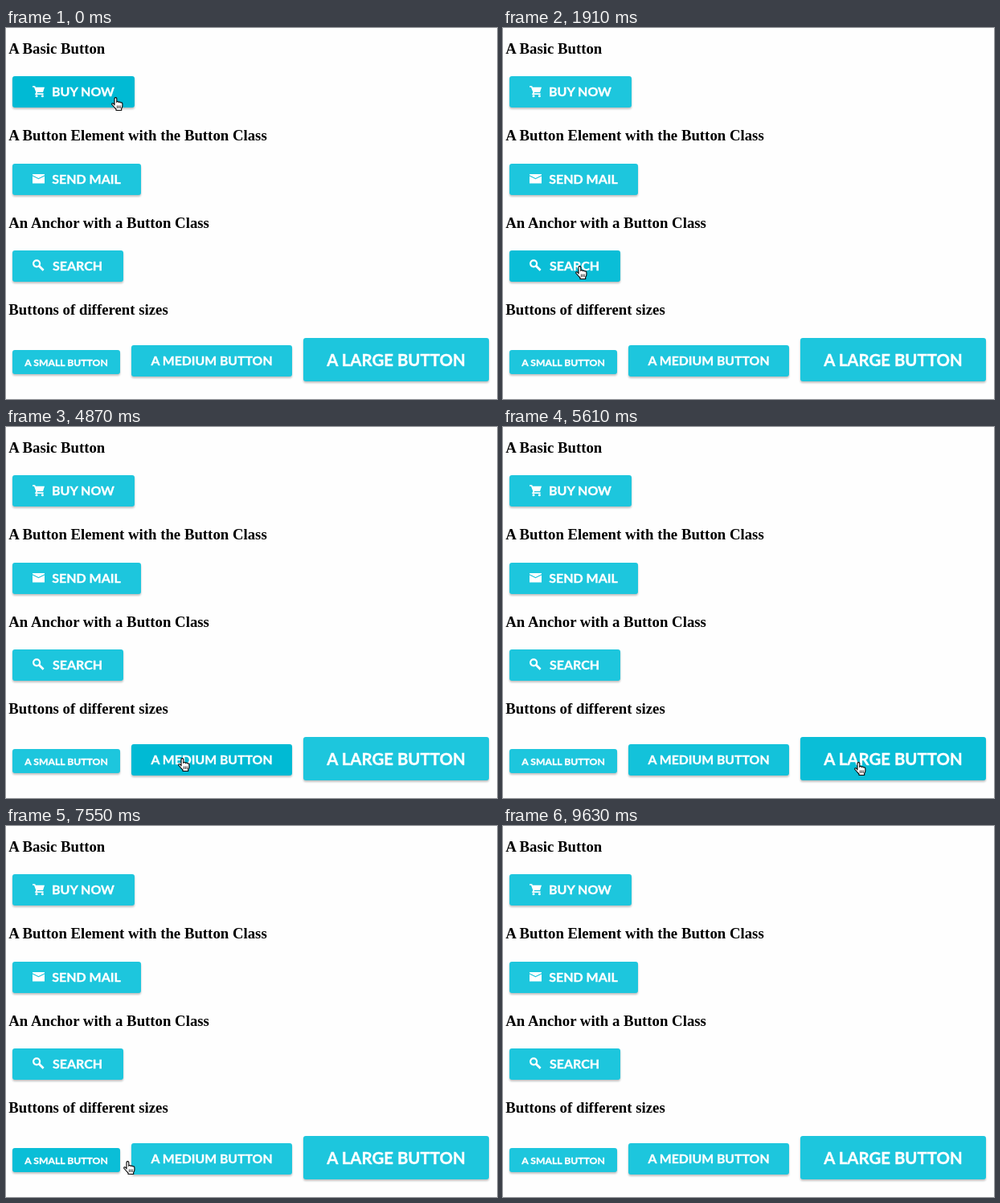
An HTML page that plays this animation: 611x462 px, repeating every 9.96 s.

```html
<!DOCTYPE html>
<html lang="en">
<head>
<meta charset="utf-8">
<title>Buttons</title>
<style>
  html, body { margin: 0; width: 100%; height: 100%; overflow: hidden; background: #fefefe; }
  svg { display: block; }
  .heading { font: bold 18.8px "Liberation Serif", Times, serif; }
  .label {
    font-family: Lato, sans-serif; font-weight: 700; text-anchor: middle;
    fill: #fff; stroke: #fff; stroke-width: .35px;
  }
  .button { filter: drop-shadow(0 2.5px 1.3px rgba(0, 0, 0, .24)); }
  .icon { fill: #fff; }
  .line { fill: none; stroke: #fff; }
</style>
</head>
<body>
<svg width="611" height="462" viewBox="0 0 611 462">
  <g id="headings"></g>
  <g id="buttons"></g>

  <g transform="translate(33 72)">
    <path class="line" stroke-width="1.7" d="M0 1H2.6L5.2 8L4.2 10.2H13.6"/>
    <path class="icon" d="M2.8 1.8H15L13 8H4.8Z"/>
    <circle class="icon" cx="5" cy="12.8" r="1.5"/>
    <circle class="icon" cx="12.4" cy="12.8" r="1.5"/>
  </g>
  <g class="icon" transform="translate(33 182)">
    <path d="M0 0H15V1.2L7.5 5L0 1.2Z"/>
    <path d="M0 2.4L7.5 6.2L15 2.4V11.5H0Z"/>
  </g>
  <g class="line" transform="translate(33 288)">
    <circle cx="5.1" cy="5.3" r="4" stroke-width="2.2"/>
    <path stroke-width="2.8" d="M8.4 8.6L13.6 13.8"/>
  </g>

  <g id="cursor" stroke="#000" stroke-linejoin="round">
    <path fill="#fff" stroke-width="1.1" d="M4 10V2a1.4 1.4 0 0 1 2.8 0V6.5q.2-1 1.3-1t1.3 1.2q.3-.7 1.2-.7t1.3 1.2q.2-.5 1-.4 1 .2 1 1.6V11q0 2-1.2 3.2V16.5H6V15Q3.5 12.5 1 9.5q-.7-1.2.3-1.7 1.2-.4 2.7 1.7z"/>
    <path stroke-width=".8" d="M7.4 10.5v3.5M9.4 10.5v3.5M11.3 10.5v3.5"/>
  </g>
</svg>
<script>
const LOOP = 9960;
const STEP = 148;     // ms per picture
const FADE_STEPS = 3; // pictures a hover fade takes
const BASE = [29, 198, 221];
const HOVER = [0, 186, 212];
const ROW = 108.5;
const ICON_SPACE = 24;

const headings = [
  'A Basic Button',
  'A Button Element with the Button Class',
  'An Anchor with a Button Class',
  'Buttons of different sizes',
];

const iconButton = (text, w, row) =>
  ({ text, x: 8, y: Math.round(60 + ROW * row), w, h: 39, size: 16, indent: ICON_SPACE });
const plainButton = (text, x, y, w, h, size) => ({ text, x, y, w, h, size, indent: 0 });

const buttons = [
  iconButton('BUY NOW', 152, 0),
  iconButton('SEND MAIL', 160, 1),
  iconButton('SEARCH', 138, 2),
  plainButton('A SMALL BUTTON', 8, 401, 134, 30, 12.2),
  plainButton('A MEDIUM BUTTON', 156, 395, 200, 39, 15.8),
  plainButton('A LARGE BUTTON', 370, 386, 231, 54, 20.4),
];

// Where the cursor rests, and the steps at which it arrives and leaves
const stops = [
  { x: 131, y: 86, arrive: 0, leave: 0 },
  { x: 109, y: 201, arrive: 5, leave: 10 },
  { x: 90, y: 296, arrive: 13, leave: 20 },
  { x: 87, y: 447, arrive: 24, leave: 25 },
  { x: 84, y: 425, arrive: 27, leave: 28 },
  { x: 214, y: 412, arrive: 33, leave: 35 },
  { x: 437, y: 417, arrive: 38, leave: 40 },
  { x: 190, y: 409, arrive: 44, leave: 46 },
  { x: 99, y: 424, arrive: 50, leave: 50 },
  { x: 184, y: 412, arrive: 53, leave: 61 },
  { x: 530, y: 472, arrive: 65, leave: 67 },
];

const mix = (a, b, u) => a + (b - a) * u;
const easeOut = u => 1 - (1 - u) ** 2;

function cursorAt(step) {
  const i = stops.findLastIndex(s => s.arrive <= step);
  const from = stops[i];
  const to = stops[i + 1];
  if (!to || step <= from.leave) return from;
  const u = easeOut((step - from.leave) / (to.arrive - from.leave));
  return { x: Math.round(mix(from.x, to.x, u)), y: Math.round(mix(from.y, to.y, u)) };
}

function isHovered(b, step) {
  const { x, y } = cursorAt(step);
  const tipX = x + 5, tipY = y + 1;
  return tipX >= b.x && tipX < b.x + b.w && tipY >= b.y && tipY < b.y + b.h;
}

// Share of the latest steps during which the cursor was over the button
function hoverLevel(b, step) {
  let count = 0;
  for (let k = 0; k < FADE_STEPS; k++) count += isHovered(b, Math.max(0, step - k));
  return count / FADE_STEPS;
}

function add(parent, tag, attributes, text = '') {
  const node = document.createElementNS('http://www.w3.org/2000/svg', tag);
  for (const name in attributes) node.setAttribute(name, attributes[name]);
  node.textContent = text;
  return document.getElementById(parent).appendChild(node);
}

headings.forEach((text, i) =>
  add('headings', 'text', { class: 'heading', x: 3.3, y: Math.round(32 + (ROW - 0.1) * i) }, text));

for (const b of buttons) {
  b.node = add('buttons', 'rect', { class: 'button', x: b.x, y: b.y, width: b.w, height: b.h, rx: 3 });
  add('buttons', 'text', {
    class: 'label',
    x: b.x + (b.w + b.indent) / 2,
    y: b.y + b.h / 2 + b.size * 0.37,
    'font-size': b.size,
  }, b.text);
}

const cursor = document.getElementById('cursor');

function draw(time) {
  const step = Math.floor((time % LOOP) / STEP + 0.14);
  const { x, y } = cursorAt(step);
  cursor.setAttribute('transform', `translate(${x} ${y})`);
  for (const b of buttons) {
    const level = hoverLevel(b, step);
    const color = BASE.map((c, i) => Math.round(mix(c, HOVER[i], level)));
    b.node.setAttribute('fill', `rgb(${color})`);
  }
}

const begin = performance.now();
function tick() {
  draw(performance.now() - begin);
  requestAnimationFrame(tick);
}
tick();
</script>
</body>
</html>
```
